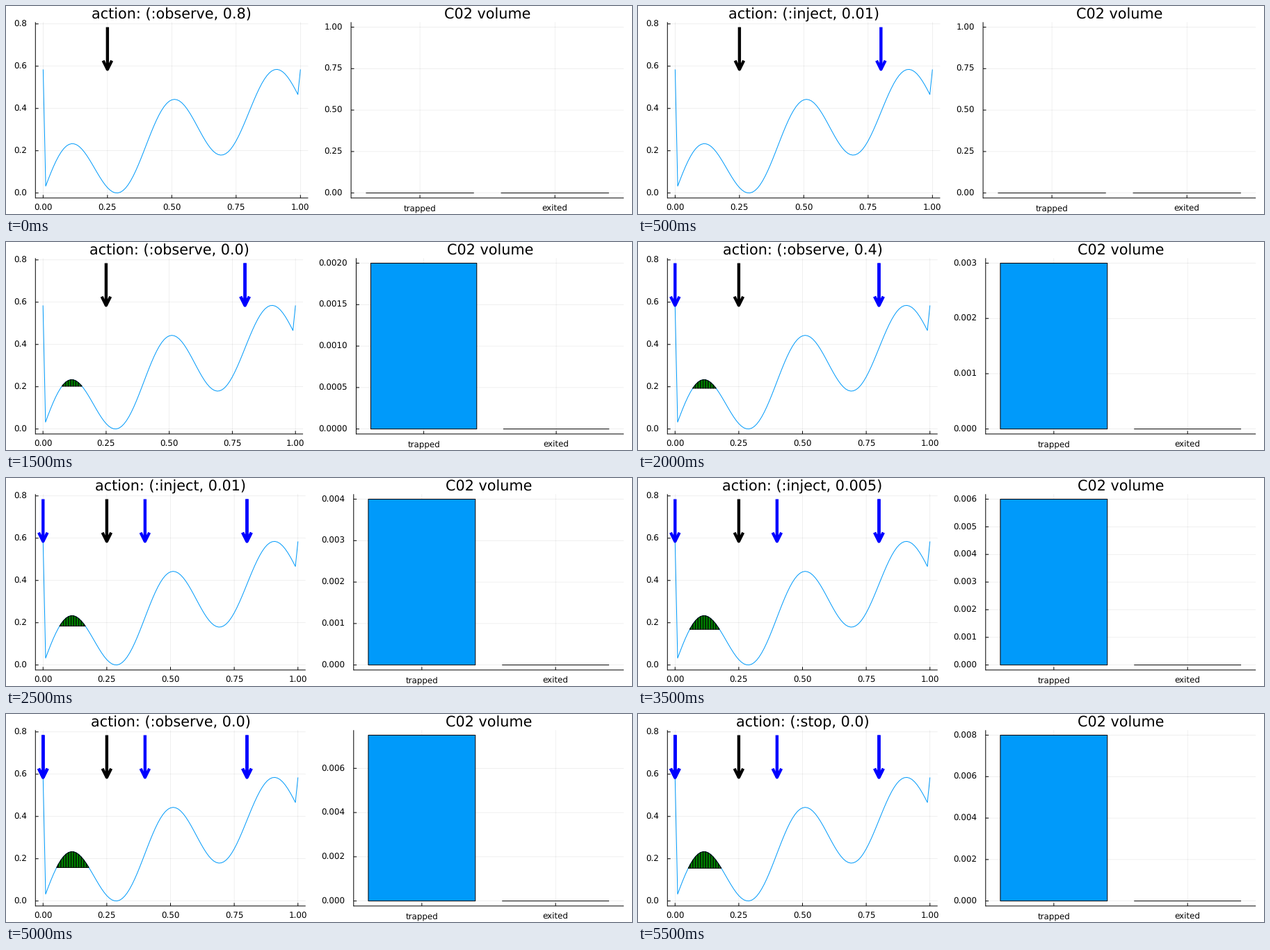
These frames come from a looping animation (900x300 px, 6 s). A matplotlib script:

```python
import numpy as np
import matplotlib.pyplot as plt
from matplotlib.animation import FuncAnimation

plt.rcParams.update({
    "font.family": "DejaVu Sans",
    "text.hinting": "no_hinting",
    "path.snap": False,
})

W, H, DPI = 900, 300, 100
PT = 72 / DPI  # points per pixel
TOP, BOTTOM = 23.3, 276.9
LEFT, RIGHT = 42.3, 888.2
BASE, DATA_TOP = 269.7, 30.5
SKY = "#009afa"

ACTIONS = [
    ("observe", 0.8), ("inject", 0.01), ("observe", 0.8), ("observe", 0.0),
    ("observe", 0.4), ("inject", 0.01), ("inject", 0.01), ("inject", 0.005),
    ("observe", 0.0), ("observe", 0.0), ("observe", 0.0), ("stop", 0.0),
]


def surface(x):
    return 0.17 * np.cos(15.67 * (x - 0.5)) + 0.655 * x - 0.2125 * x**2


fine = np.linspace(0.01, 0.99, 2000)
floor = surface(fine).min()
grid_x = np.linspace(0, 1, 101)
heights = surface(grid_x) - floor
crest = heights[1:-1].max()
heights[[0, -1]] = crest
lobe_x = np.linspace(0.02, 0.25, 1200)
lobe = surface(lobe_x) - floor

fig = plt.figure(figsize=(W / DPI, H / DPI), dpi=DPI, facecolor="white")
ax = fig.add_axes([0, 0, 1, 1])


def stroke(xs, ys, color="black", width=1.0, **style):
    ax.plot(xs, ys, color=color, lw=width * PT, solid_capstyle="butt",
            solid_joinstyle="round", **style)


def label(x, y, text, size=11.9, align="center"):
    ax.text(x, y, text, fontsize=size * PT, ha=align, va="baseline")


def panel(left, width, title, x_ticks, y_ticks):
    """Draw grid, axes, inward ticks, labels and title of one plot."""
    right = left + width
    for x, text in x_ticks:
        stroke([x, x], [TOP, BOTTOM], width=0.6, alpha=0.1)
        stroke([x, x], [BOTTOM, BOTTOM - 4.4], zorder=3)
        label(x, 295, text)
    for y, text in y_ticks:
        stroke([left, right], [y, y], width=0.6, alpha=0.1)
        stroke([left, left + 4.4], [y, y], zorder=3)
        label(left - 12.3, y + 4, text, align="right")
    stroke([left, left], [TOP, BOTTOM + 0.5], zorder=3)
    stroke([left, right], [BOTTOM, BOTTOM], zorder=3)
    label(left + width / 2, 18.3, title, size=20.8)


def arrow(x, tip, color):
    stroke([x, x], [DATA_TOP, tip], color, 4.4, zorder=5)
    stroke([x - 6.3, x, x + 6.3], [tip - 12.7, tip, tip - 12.7], color, 4.2,
           zorder=5)


def state(step):
    """Trapped volume and observed positions before the given step."""
    volume, rate, seen = 0.0, 0.0, []
    for kind, value in ACTIONS[:step]:
        if kind == "inject":
            rate = value
        elif kind == "observe":
            seen.append(value)
        volume += 0.1 * rate
    return volume, seen


def volume_ticks(volume):
    if volume == 0:
        return 1.0, 0.25, 2
    for limit, step, digits in ((0.0015, 0.00025, 5), (0.0025, 0.0005, 4),
                                (0.0068, 0.001, 3), (1, 0.002, 3)):
        if volume < limit:
            return volume, step, digits


def draw_plume(volume, px, py):
    level = lobe.max() - 1.962 * volume ** (2 / 3)
    inside = lobe_x[lobe >= level]
    lo, hi = inside[0], inside[-1]
    edges = [lo, *grid_x[(grid_x > lo) & (grid_x < hi)], hi]
    for a, b in zip(edges, edges[1:]):
        tops = surface(np.array([a, b])) - floor
        ax.fill(px(np.array([a, a, b, b])),
                py(np.array([level, tops[0], tops[1], level])),
                facecolor="green", edgecolor="black", lw=PT,
                joinstyle="round", zorder=4)


def draw_reservoir(width, step, volume, seen):
    unit = width / 1.06
    scale = (BASE - DATA_TOP) / (crest + 0.2)

    def px(x):
        return LEFT + 0.03 * unit + x * unit

    def py(y):
        return BASE - y * scale

    kind, value = ACTIONS[step]
    panel(LEFT, width, f"action: (:{kind}, {value})",
          [(px(x), f"{x:.2f}") for x in np.arange(5) / 4],
          [(py(y), f"{y:.1f}") for y in np.arange(5) / 5])
    stroke(px(grid_x), py(heights), SKY, zorder=3)
    if volume > 0:
        draw_plume(volume, px, py)
    arrow(px(0.25), py(crest), "black")
    for x in seen:
        arrow(px(x), py(crest), "blue")


def draw_volume(width, volume, top, step, digits):
    left = RIGHT - width
    unit = width / 2.02
    centers = [left + 0.51 * unit, left + 1.51 * unit]
    scale = (BASE - DATA_TOP) / top
    values = step * np.arange(int(top / step + 1e-6) + 1)
    panel(left, width, "C02 volume", list(zip(centers, ("trapped", "exited"))),
          [(BASE - v * scale, f"{v:.{digits}f}") for v in values])
    for x, amount in zip(centers, (volume, 0)):
        a, b, y = x - 0.4 * unit, x + 0.4 * unit, BASE - amount * scale
        if amount:
            ax.fill([a, a, b, b], [BASE, y, y, BASE], facecolor=SKY,
                    edgecolor="black", lw=PT, zorder=4)
        else:
            stroke([a, b], [BASE, BASE], zorder=4)


def draw(step):
    ax.clear()
    ax.set_axis_off()
    ax.set_xlim(0, W)
    ax.set_ylim(H, 0)
    volume, seen = state(step)
    top, tick_step, digits = volume_ticks(volume)
    width = 392.1 - 3.68 * (digits - 2)  # longer labels narrow both plots
    draw_reservoir(width, step, volume, seen)
    draw_volume(width, volume, top, tick_step, digits)
    return []


animation = FuncAnimation(fig, draw, frames=len(ACTIONS), init_func=lambda: [],
                          interval=500, repeat=True, repeat_delay=0)
plt.show()
```
